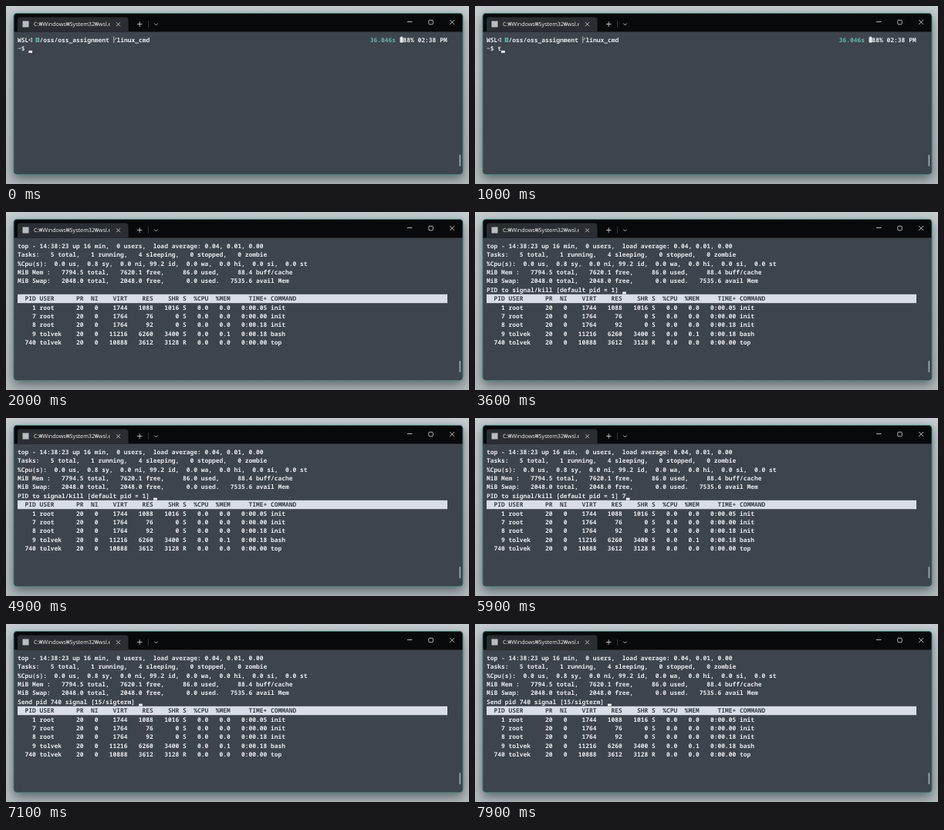
An HTML page for the animation above (8 s loop, 600 px wide and 231 px high).

```html
<!DOCTYPE html>
<html lang="en">
<head>
<meta charset="utf-8">
<title>Terminal</title>
<style>
  html, body { margin: 0; width: 100%; height: 100%; overflow: hidden; }
  body { position: relative; background: linear-gradient(#c6cdd0, #b3babd); }
  #win {
    position: absolute; left: 10px; top: 9px; width: 582px; height: 210px;
    border-radius: 4px; box-shadow: 0 5px 14px rgba(20, 28, 32, .55);
  }
  svg { position: absolute; left: 0; top: 0; display: block; }
  text { white-space: pre; text-rendering: geometricPrecision; }
  #screen text {
    font: 600 7.93px "Noto Sans Mono", "Liberation Mono", monospace;
    font-variant-ligatures: none; fill: #e6e9ec;
  }
  #screen .teal { fill: #58b5a8; }
  #screen .dark { fill: #3a4048; }
  #screen .bold { font-weight: 700; }
  .title { font: 500 7.2px "Open Sans", "Noto Sans", sans-serif; fill: #f4f4f4; }
  .line { fill: none; stroke: #dcdee0; stroke-width: .8; }
</style>
</head>
<body>
<div id="win"></div>
<svg width="600" height="231" viewBox="0 0 600 231">
  <defs>
    <clipPath id="tabClip"><rect x="34" y="15" width="100.5" height="18"/></clipPath>
  </defs>
  <rect x="10" y="9.5" width="582" height="209" rx="4" fill="#3e444c"/>
  <path d="M10 33.5V13.5a4 4 0 0 1 4-4H588a4 4 0 0 1 4 4V33.5Z" fill="#08090b"/>
  <path d="M13 33.5q2 0 2-2V18q0-3.500 3.500-3.500H155q3.500 0 3.500 3.500V31.500q0 2 2 2Z" fill="#2a2d31"/>
  <rect x="10" y="9.500" width="582" height="209" rx="4" fill="none" stroke="#2f8478"/>
  <rect x="21.500" y="19.500" width="8" height="8" fill="#b9bdc1"/>
  <text class="title" x="36" y="26.300" clip-path="url(#tabClip)">C:₩Windows₩System32₩wsl.exe</text>
  <path class="line" d="M143 21.200l5 5m0-5l-5 5M170 23.500h6.500m-3.250-3.250v6.500M192.300 22.600l2.200 2.200 2.200-2.200M520 20.500h6.500M575.200 18l6 6m0-6l-6 6"/>
  <rect class="line" x="547.800" y="18.300" width="5.500" height="5.500" rx="1"/>
  <path d="M184.500 19v9" stroke="#3a3d40" stroke-width=".8"/>
  <rect x="587.500" y="193" width="1.700" height="15" rx=".8" fill="#a3a7ab"/>
  <g id="screen">
    <g id="shell">
      <path class="line" d="M33.500 41.500v5l-4-2.500Z"/>
      <rect x="38.600" y="41" width="4.600" height="6" fill="#58b5a8"/>
      <path d="M39.800 43h2.200M39.800 45h2.200" stroke="#3e444c" stroke-width=".7"/>
      <path class="line" d="M139.800 39.500v8.500M142.500 41v1.500l-2.200 1.500"/>
      <rect x="510.500" y="40.500" width="4.200" height="7" rx=".8" fill="#e6e9ec"/>
      <rect x="511.700" y="39.600" width="1.800" height="1.500" fill="#e6e9ec"/>
    </g>
    <g id="top">
      <rect x="15" y="106.800" width="557" height="11.400" fill="#d9dee6"/>
    </g>
    <rect id="cursor" width="4.760" height="2.900" fill="#f2f4f5"/>
  </g>
</svg>
<script>
const $ = id => document.getElementById(id);
const CELL = 4.758, ROW = 11.42, LEFT = 15, TOP = 38.3;
const colX = col => LEFT + col * CELL;

function put(parent, row, col, str, cls = '') {
  const el = document.createElementNS('http://www.w3.org/2000/svg', 'text');
  el.setAttribute('x', colX(col));
  el.setAttribute('y', TOP + row * ROW + 8.4);
  el.setAttribute('class', cls);
  el.textContent = str;
  return $(parent).appendChild(el);
}

// Shell prompt
put('shell', 0, 0, 'WSL');
put('shell', 0, 6, '/oss/oss_assignment');
put('shell', 0, 27, 'linux_cmd');
put('shell', 0, 96, '36.046s', 'teal');
put('shell', 0, 105, '88%');
put('shell', 0, 109, '02:38 PM');
const command = put('shell', 1, 0, '');

// Process monitor
[
  'top - 14:38:23 up 16 min,  0 users,  load average: 0.04, 0.01, 0.00',
  'Tasks:   5 total,   1 running,   4 sleeping,   0 stopped,   0 zombie',
  '%Cpu(s):  0.0 us,  0.8 sy,  0.0 ni, 99.2 id,  0.0 wa,  0.0 hi,  0.0 si,  0.0 st',
  'MiB Mem :   7794.5 total,   7620.1 free,     86.0 used,     88.4 buff/cache',
  'MiB Swap:   2048.0 total,   2048.0 free,      0.0 used.   7535.6 avail Mem'
].forEach((str, i) => put('top', i, 0, str));
const message = put('top', 5, 0, '');

const tableRow = (pid, user, pr, ni, virt, res, shr, s, cpu, mem, time, cmd) =>
  pid.padStart(5) + ' ' + user.padEnd(9) + pr.padStart(3) + ni.padStart(4) +
  virt.padStart(8) + res.padStart(7) + shr.padStart(7) + ' ' + s +
  cpu.padStart(6) + mem.padStart(6) + time.padStart(10) + ' ' + cmd;

put('top', 6, 0, tableRow(...'PID USER PR NI VIRT RES SHR S %CPU %MEM TIME+ COMMAND'.split(' ')), 'dark');
[
  '1 root 20 0 1744 1088 1016 S 0.0 0.0 0:00.05 init',
  '7 root 20 0 1764 76 0 S 0.0 0.0 0:00.00 init',
  '8 root 20 0 1764 92 0 S 0.0 0.0 0:00.18 init',
  '9 tolvek 20 0 11216 6260 3400 S 0.0 0.1 0:00.18 bash',
  '740 tolvek 20 0 10888 3612 3128 R 0.0 0.0 0:00.00 top'
].forEach((str, i) => put('top', 7 + i, 0, tableRow(...str.split(' ')), i === 4 ? 'bold' : ''));

// Number of characters typed, given the time of each key
const typed = (str, keys, t) => str.slice(0, keys.filter(k => t >= k).length);

function draw(now) {
  const t = now % 8000, inTop = t >= 2000;
  $('shell').style.display = inTop ? 'none' : '';
  $('top').style.display = inTop ? '' : 'none';

  const cmd = '~$ ' + typed('top', [1000, 1100, 1200], t);
  const msg = t < 3600 ? '' : t < 7100
    ? 'PID to signal/kill [default pid = 1] ' + typed('740', [5900, 6100, 6500], t)
    : 'Send pid 740 signal [15/sigterm] ';
  command.textContent = cmd;
  message.textContent = msg;

  const cursor = $('cursor');
  cursor.style.display = t >= 1800 && t < 3600 ? 'none' : '';
  cursor.setAttribute('x', colX((inTop ? msg : cmd).length));
  cursor.setAttribute('y', TOP + (inTop ? 5 : 1) * ROW + 8.2);
  requestAnimationFrame(draw);
}
draw(performance.now());
</script>
</body>
</html>
```
